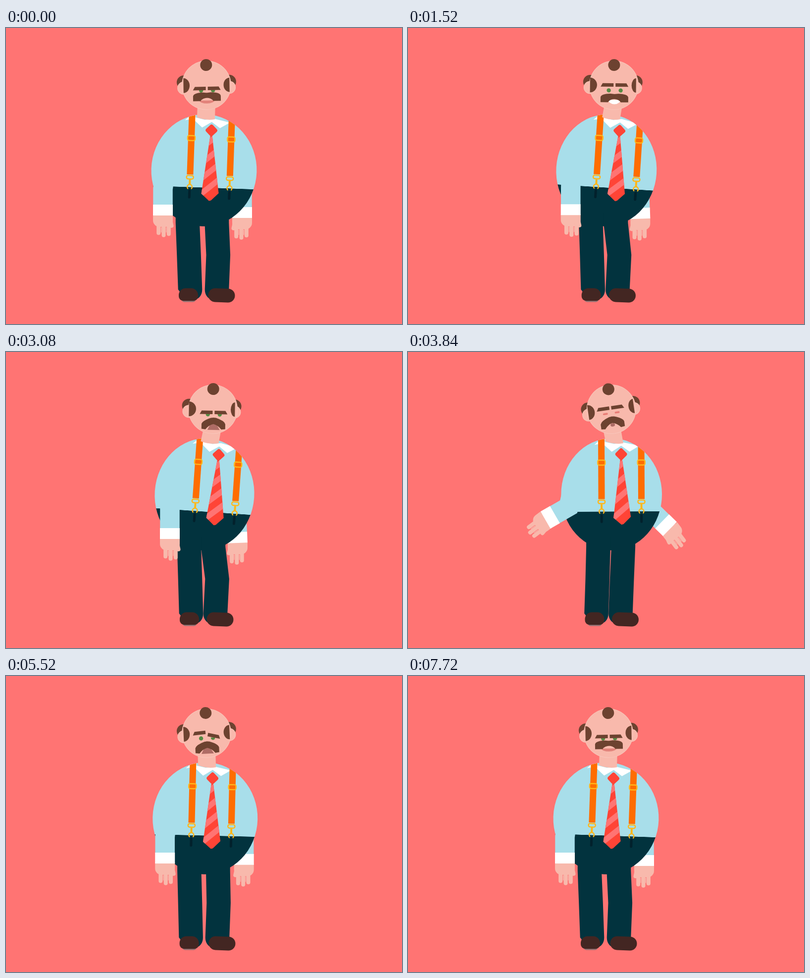
Animation of 800x600 px, one loop 7.76 s. Source, as an HTML page with a canvas:

```html
<!DOCTYPE html>
<html>
<head>
<meta charset="utf-8">
<style>
html, body { margin: 0; width: 100%; height: 100%; overflow: hidden; background: #ff7473; }
canvas { display: block; }
</style>
</head>
<body>
<canvas id="stage" width="800" height="600"></canvas>
<script>
const c = document.getElementById('stage').getContext('2d');
const LOOP = 7760, RAD = Math.PI / 180, TURN = Math.PI * 2;
const BG = '#ff7473', SHIRT = '#a8deea', PANTS = '#02333e', LOOPS = '#02212c', SKIN = '#f8b9ac',
  RIM = '#f9c6bb', HAIR = '#6d4230', SHOE = '#432622', ORANGE = '#ff6d00', GOLD = '#ffb71b',
  RED = '#ff4436', LIP = '#ae6c65';

function step(t, from, to) {
  const u = Math.min(1, Math.max(0, (t - from) / (to - from)));
  return u * u * (3 - 2 * u);
}
const pulse = (t, up, top, down, end) => step(t, up, top) - step(t, down, end);

// turn faces him to the right, shift moves his weight, raise spreads the arms
const turnAt = t => pulse(t, 850, 1750, 3150, 4350);
const shiftAt = t => pulse(t, 3150, 4150, 4850, 5750);
const raiseAt = t => pulse(t, 3150, 3850, 4720, 5180);
const rightAngle = t => -58 * raiseAt(t) * shiftAt(t);

function mouthAt(t) {
  if (t < 1150 || t > 5900) return 'lip';
  if (t < 2150) return 'teeth';
  if (t < 3500) return 'open';
  if (t < 4250) return 'dot';
  return t < 5250 ? 'teeth' : 'open';
}

function at(x, y, deg, draw) {
  c.save();
  c.translate(x, y);
  c.rotate(deg * RAD);
  draw();
  c.restore();
}
function poly(color, ...pts) {
  c.beginPath();
  pts.forEach(p => c.lineTo(...p));
  c.fillStyle = color;
  c.fill();
}
function line(color, width, cap, ...pts) {
  c.beginPath();
  pts.forEach(p => c.lineTo(...p));
  c.lineWidth = width;
  c.lineCap = cap;
  c.strokeStyle = color;
  c.stroke();
}
function oval(color, x, y, rx, ry = rx, from = 0, to = TURN) {
  c.beginPath();
  c.ellipse(x, y, rx, ry, 0, from, to);
  c.fillStyle = color;
  c.fill();
}
function box(color, x, y, w, h, r) {
  c.beginPath();
  c.roundRect(x, y, w, h, r);
  c.fillStyle = color;
  c.fill();
}
function ring(x, y, w, h) {
  c.beginPath();
  c.roundRect(x - w / 2, y, w, h, 3);
  c.lineWidth = 2.4;
  c.strokeStyle = GOLD;
  c.stroke();
}

function hand(side) {
  c.scale(side, 1);
  box(SKIN, -20, -2, 40, 25, [0, 0, 13, 13]);
  for (const i of [-1, 0, 1])
    line(SKIN, 8, 'round', [1.5 + 10.3 * i, 15], [1.5 + 10.3 * i, 40 + i - 3.5 * i * i]);
  line(SKIN, 8, 'round', [15, 10], [17.5, 21]);
  for (const x of [-3.5, 6.8]) line(RIM, 1, 'round', [x, 24], [x, 34]);
}

// side is 1 for the arm on the left of the stage, -1 for the other
function arm(side, bx, ex, ey, angle, handAngle) {
  const dx = -Math.sin(angle * RAD), dy = Math.cos(angle * RAD);
  const along = d => [ex + dx * d, ey + dy * d];
  at(...along(54), handAngle, () => hand(side));
  line(SHIRT, 39.5, 'butt', [bx - side * 70, 240], [ex, ey], along(33));
  line('#fff', 40, 'butt', along(32), along(54));
}

function leg(side, hip, ankle, bend) {
  const w = 24.3 * side, knee = (hip + ankle) / 2 + Math.max(0, bend);
  c.beginPath();
  c.moveTo(hip - w, 375);
  c.lineTo(hip - w, 395);
  c.lineTo(knee - w, 460);
  c.lineTo(ankle - w, 530);
  c.lineTo(ankle - w / 2, 546);
  c.lineTo(ankle + w * .4, 551);
  c.quadraticCurveTo(ankle + w, 546, ankle + w, 530);
  c.lineTo(knee + w, 460);
  c.lineTo(hip + w, 402);
  c.lineTo(hip + w, 375);
  c.fillStyle = PANTS;
  c.fill();
}

function legs(turn, shift, tilt) {
  const left = 372 + 2 * turn + 10 * shift, right = 426 - 3 * turn + 6 * shift;
  leg(1, 367 + 3 * turn + 21 * shift, left, -1.5 * tilt);
  leg(-1, 426 - 7 * turn + 15 * shift, right, 1.4 * tilt);
  box('#927071', left - 17, 545, 28, 10.5, 5);
  box(SHOE, left - 23, 527.5, 39, 25.5, [14, 14, 9, 9]);
  at(right - 17, 527, 2, () => box(SHOE, 0, 0, 54, 28, 14));
}

function clasp(x, y) {
  ring(x, y - 5, 15, 10);
  ring(x, y + 76, 14, 7);
  line(GOLD, 4, 'butt', [x, y + 84], [x, y + 95]);
  c.beginPath();
  c.arc(x, y + 99, 5, 2.2, 7.2);
  c.lineWidth = 2.4;
  c.stroke();
  line(LOOPS, 5, 'round', [x, y + 107], [x, y + 120]);
}

function collar() {
  poly('#fff', [-54, -20], [-33, -40], [-33, -26], [-14, -22], [3, -25], [37, -18],
    [17, -6], [0, -18], [-19, -6], [-38, -23]);
}

function tie() {
  c.save();
  poly(RED, [-2, 10], [2, 10], [19, 126], [4, 141], [0, 142], [-16, 128]);
  c.clip();
  for (let y = 19.5; y < 130; y += 31.5)
    line(BG, 11.4, 'butt', [-40, y + 34], [40, y - 34]);
  c.restore();
  at(0, -1, 45, () => box(RED, -9.5, -9.5, 19, 19, 4));
}

function belly(bx, radius, tilt) {
  at(bx, 288.5, tilt, () => {
    const cloth = c.createLinearGradient(0, 34.7, 0, 35.3);
    cloth.addColorStop(0, SHIRT);
    cloth.addColorStop(1, PANTS);
    oval(cloth, 0, 0, radius, 113.5);
  });
}

function outfit(bx, radius, kx, ky, tilt, neckTop, neckBase) {
  const straps = [-40, 40.5];
  c.save();
  c.beginPath();
  c.ellipse(bx, 288.5, radius, 113.5, tilt * RAD, 0, TURN);
  c.clip();
  at(kx, ky, tilt, () => {
    collar();
    straps.forEach(x => box(ORANGE, x - 6.5, -60, 13, 150, 0));
  });
  c.restore();
  c.beginPath();
  c.moveTo(neckTop - 18, 150);
  c.lineTo(neckTop + 18, 150);
  c.lineTo(neckBase + 18, 185);
  c.quadraticCurveTo(neckBase, 188, neckBase - 18, 181);
  c.fillStyle = SKIN;
  c.fill();
  at(kx, ky, tilt, () => {
    straps.forEach(x => clasp(x, 16));
    tie();
  });
}

function brow(side, y, deg) {
  at(side * 15, y - .5, deg, () => {
    c.scale(side, 1);
    poly(HAIR, [-13, -3.5], [9, -3.5], [13, 3.5], [-13, 3.5]);
  });
}

function eye(x, open, blink) {
  if (blink > .5) return box('#e97d76', x - 5, 8.5, 10, 3.6, 2);
  oval('#558b43', x, 10.5, 4.2);
  c.fillStyle = SKIN;
  c.fillRect(x - 5, 5.5, 10, 4 * (1 - open));
}

const mouths = {
  lip: () => oval('#e2837b', 0, 34, 15, 6, 0, Math.PI),
  teeth: () => oval('#fff', 0, 30, 12, 9, 0, Math.PI),
  open: () => poly(LIP, [-6, 30], [6, 30], [13, 42], [-12, 42]),
  dot: () => oval(LIP, 0, 34, 4.5, 3.5)
};

function moustache(droop) {
  const mix = (a, b) => a + (b - a) * droop, shoulder = mix(18, 23), end = mix(35, 40);
  for (const side of [1, -1]) {
    c.save();
    c.scale(side, 1);
    c.beginPath();
    c.moveTo(-.5, mix(18.5, 17));
    c.lineTo(mix(8, 5), 17.5);
    c.quadraticCurveTo(mix(27, 22), shoulder, mix(28, 24), shoulder + 7);
    c.lineTo(mix(28, 24), end);
    c.lineTo(mix(13, 16), end + droop);
    c.quadraticCurveTo(9, mix(29, 32), -.5, mix(28.5, 30));
    c.fillStyle = HAIR;
    c.fill();
    c.restore();
  }
}

function head(t, turn, shift) {
  for (const side of [-1, 1]) {
    const x = side * 46 - 2.5 * turn;
    oval(HAIR, x, -6.5, 14);
    oval(RIM, x, 5, 13);
    oval(SKIN, x, 5, 12);
  }
  oval(RIM, 0, 0, 50);
  oval(SKIN, 0, 0, 49);
  oval(HAIR, -46.5 - 2 * turn, 0, 12.5 + 2 * turn, 15, -TURN / 4, TURN / 4);
  oval(HAIR, 46.5 - 2 * turn, 0, 12 - 3.5 * turn, 14.5, TURN / 4, TURN * .75);
  oval(HAIR, 0, -41, 12);

  const cheer = pulse(t, 850, 1400, 1950, 2300);
  const left = cheer + pulse(t, 3200, 3700, 5700, 6000);
  const right = cheer + pulse(t, 3200, 3700, 4000, 4350);
  const blink = pulse(t, 3650, 3750, 3950, 4050);
  const droop = pulse(t, 1900, 2300, 4100, 4400) + pulse(t, 5000, 5300, 5700, 6000);
  c.translate(.5 + turn - 3.5 * shift, -3 * shift);
  eye(-11.5, left, blink);
  eye(12.5, right, blink);
  brow(-1, 7 * (1 - left), -4 * (left - right));
  brow(1, 7 * (1 - right), 14 * (left - right));
  c.translate(0, -3 * (1 - turn) * (1 - droop));
  mouths[mouthAt(t)]();
  moustache(droop);
}

function draw(t) {
  const turn = turnAt(t), shift = shiftAt(t), raise = raiseAt(t);
  const bx = 400 + turn + 14 * shift, radius = 106.5 - 6 * turn - 3 * shift;
  const kx = 415 + 14.5 * turn + 13 * shift, ky = 208.5 + turn - shift;
  const tilt = 2 + 2 * turn - 3.9 * shift, hx = 405 + 13 * turn + shift;
  c.fillStyle = BG;
  c.fillRect(0, 0, 800, 600);
  // the right hand trails its arm
  arm(-1, bx, bx + 77 - 12 * turn + 9 * shift, 331 + 2 * turn - 14 * shift,
    rightAngle(t) - 2 * turn, rightAngle(t - 80));
  belly(bx, radius, tilt);
  legs(turn, shift, tilt);
  outfit(bx, radius, kx, ky, tilt, hx, kx - 11 - 7 * turn);
  arm(1, bx, bx - 83 + 13 * turn + 12 * shift - 18 * raise, 326 - turn - 12 * raise ** 2,
    60 * raise, 53 * raise);
  at(hx, 116, -1 + 2 * turn - 10.5 * shift, () => head(t, turn, shift));
}

const start = performance.now();
function frame() {
  draw((performance.now() - start) % LOOP);
  requestAnimationFrame(frame);
}
frame();
</script>
</body>
</html>
```
